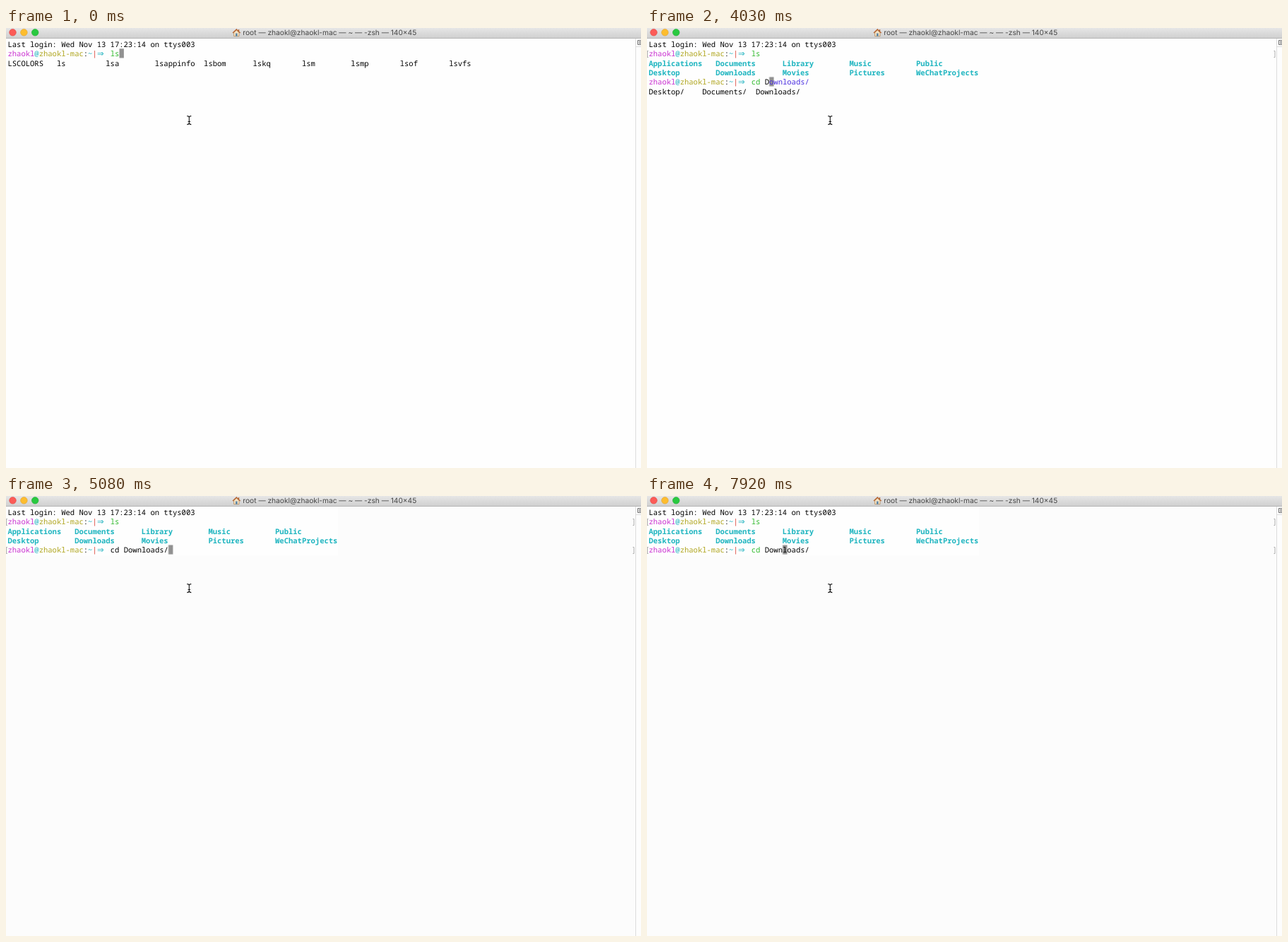
Animation of 899x623 px, one loop 8000 ms. Source, as an HTML page:

```html
<!DOCTYPE html>
<html lang="en">
<head>
<meta charset="utf-8">
<title>Terminal</title>
<style>
html, body { margin: 0; width: 100%; height: 100%; overflow: hidden; background: #fefefe; }
svg { display: block; width: 899px; height: 623px; }
text { white-space: pre; text-rendering: geometricPrecision; }
.term { font: 10.53px "Noto Sans Mono", "DejaVu Sans Mono", monospace; fill: #000; }
.title { font: 10.2px Inter, "Liberation Sans", sans-serif; fill: #464646; }
.dirs { font-weight: 700; fill: #1fb5c0; }
.user { fill: #c92fd0; }
.host { fill: #afa51e; }
.cyan { fill: #22b3c0; }
.red { fill: #d8382c; }
.green { fill: #2fba2c; }
.hint { fill: #4a2ee0; }
.arrow { font: 11.5px "DejaVu Sans", sans-serif; }
.marks { fill: none; stroke: #9a9a9a; stroke-width: .8; }

/* 1% = 80 ms; everything switches in hard steps */
.anim, .anim tspan, .cursor { animation: 8s step-end infinite; }
.first { animation-name: first; }
.listing { animation-name: listing; }
.prompt { animation-name: prompt; }
.long { animation-name: long; }
.typed { animation-name: typed; }
.cmds { animation-name: cmds; }
.three { animation-name: three; }
.two { animation-name: two; }
.entered { animation-name: entered; }
.after { animation-name: after; }
.flash { animation-name: flash; }
.cursor { animation-name: cursor; }
.typed .cd { animation-name: cd; }
.typed .d { animation-name: d; }
.typed .o { animation-name: o; }
.typed .rest { animation-name: rest; }

@keyframes first { 0% { visibility: visible } 16.875%, 100% { visibility: hidden } }
@keyframes listing { 0% { visibility: hidden } 16.875%, 100% { visibility: visible } }
@keyframes prompt { 0% { visibility: hidden } 18.75%, 100% { visibility: visible } }
@keyframes long { 0% { visibility: hidden } 28.125% { visibility: visible } 30%, 100% { visibility: hidden } }
@keyframes typed { 0% { visibility: hidden } 30%, 100% { visibility: visible } }
@keyframes cmds { 0% { visibility: hidden } 30% { visibility: visible } 50.375%, 100% { visibility: hidden } }
@keyframes three { 0% { visibility: hidden } 50.375% { visibility: visible } 52.25%, 100% { visibility: hidden } }
@keyframes two { 0% { visibility: hidden } 52.25% { visibility: visible } 54.125%, 100% { visibility: hidden } }
@keyframes entered { 0% { visibility: hidden } 59.75%, 100% { visibility: visible } }
@keyframes after { 0% { visibility: hidden } 61.625%, 100% { visibility: visible } }
@keyframes flash {
  0% { opacity: 0 } 59.75% { opacity: .19 } 61.625% { opacity: 0 }
  78.375% { opacity: .17 } 80.25%, 100% { opacity: 0 }
}
@keyframes cd {
  0% { fill: #000 } 31.75% { fill: #2fba2c } 59.75% { fill: #000 } 89.625%, 100% { fill: #2fba2c }
}
@keyframes d { 0% { fill: #4a2ee0 } 50.375%, 100% { fill: #000 } }
@keyframes o { 0% { fill: #4a2ee0 } 52.25%, 100% { fill: #000 } }
@keyframes rest { 0% { fill: #4a2ee0 } 54.125%, 100% { fill: #000 } }
@keyframes cursor {
  0% { transform: translate(157.95px, 13.37px) }
  16.875% { transform: translate(0, 53.48px) }
  18.75% { transform: translate(145.31px, 53.48px) }
  28.125% { transform: translate(151.63px, 53.48px) }
  30% { transform: translate(157.95px, 53.48px) }
  31.75% { transform: translate(164.27px, 53.48px) }
  50.375% { transform: translate(170.59px, 53.48px) }
  52.25% { transform: translate(176.9px, 53.48px) }
  54.125% { transform: translate(183.22px, 53.48px) }
  59.75% { transform: translate(227.45px, 53.48px) }
  89.625% { transform: translate(221.13px, 53.48px) }
  91.5% { transform: translate(214.81px, 53.48px) }
  93.375% { transform: translate(208.49px, 53.48px) }
  95.25% { transform: translate(202.18px, 53.48px) }
  97.125% { transform: translate(195.86px, 53.48px) }
  99%, 100% { transform: translate(189.54px, 53.48px) }
}
</style>
</head>
<body>
<svg viewBox="0 0 899 623">
  <defs>
    <linearGradient id="bar" x2="0" y2="1">
      <stop stop-color="#e6e6e6"/><stop offset="1" stop-color="#d0d0d0"/>
    </linearGradient>
    <g id="ps1">
      <text><tspan class="user">zhaokl</tspan><tspan class="cyan">@</tspan><tspan class="host">zhaokl-mac</tspan>:<tspan class="cyan">~</tspan><tspan class="red">|</tspan></text>
      <text x="126.4" class="cyan arrow">⇒</text>
    </g>
    <path id="marks" d="M2 32.5H.5V41.5H2M887.5 32.5H889V41.5H887.5"/>
  </defs>

  <rect width="899" height="623" fill="#fefefe"/>
  <g class="anim after">
    <rect y="15" width="891" height="608" fill="#fcfcfc"/>
    <rect y="15" width="470" height="69" fill="#fefefe"/>
  </g>

  <rect class="cursor" x="2.5" y="15.9" width="6.4" height="13.2" fill="#919191"/>

  <g class="term" transform="translate(2.5 27)">
    <text>Last login: Wed Nov 13 17:23:14 on ttys003</text>
    <g transform="translate(0 13.37)">
      <use href="#ps1"/>
      <text x="145.3" class="green">ls</text>
    </g>
    <text y="26.74" class="anim first">LSCOLORS   ls         lsa        lsappinfo  lsbom      lskq       lsm        lsmp       lsof       lsvfs</text>
    <g class="anim listing">
      <text y="26.74" class="dirs">Applications   Documents      Library        Music          Public</text>
      <text y="40.11" class="dirs">Desktop        Downloads      Movies         Pictures       WeChatProjects</text>
    </g>
    <g transform="translate(0 53.48)">
      <g class="anim prompt"><use href="#ps1"/></g>
      <g class="anim long">
        <text x="145.3">c<tspan class="hint">p -r ~/Documents/projects/demo/src/main/resources/config/ ~/Documents/projects/demo/build/classes/main/resources/con</tspan></text>
        <text y="13.37" class="hint">fig/</text>
      </g>
      <text x="145.3" class="anim typed"><tspan class="cd">cd</tspan> <tspan class="d">D</tspan><tspan class="o">o</tspan><tspan class="rest">wnloads/</tspan></text>
    </g>
    <g transform="translate(0 66.85)">
      <text class="anim cmds">CDPATH  cd      cdpath</text>
      <text class="anim three">Desktop/    Documents/  Downloads/</text>
      <text class="anim two">Documents/  Downloads/</text>
    </g>
  </g>

  <g class="marks">
    <use href="#marks" class="anim listing"/>
    <use href="#marks" y="40" class="anim entered"/>
  </g>
  <rect class="anim flash" y="15" width="891" height="608" fill="#a0a0a0"/>

  <!-- scroll track -->
  <rect x="891" y="15" width="8" height="608" fill="#fdfdfd"/>
  <path d="M891.5 15V623M892 26.5H899" stroke="#dcdcdc"/>
  <path d="M899 17.5H894.5V23.5H899M896 19.5H899M896 21.5H899" fill="none" stroke="#6a6a6a"/>

  <!-- title bar -->
  <rect width="899" height="14" fill="url(#bar)"/>
  <rect y="14" width="899" height="1" fill="#b4b4b4"/>
  <g stroke-width=".6">
    <circle cx="9.5" cy="6.3" r="4.8" fill="#fc5b57" stroke="#dd4540"/>
    <circle cx="25.4" cy="6.3" r="4.8" fill="#fdbd2e" stroke="#dea033"/>
    <circle cx="41.2" cy="6.3" r="4.8" fill="#29c940" stroke="#25a934"/>
  </g>
  <path d="M322.6 6.5V11.6H330V6.5L326.3 3Z" fill="#f3e2c4" stroke="#b58a58" stroke-width=".8"/>
  <path d="M321 7L326.3 2L331.6 7M329.5 2V5" fill="none" stroke="#b5632f" stroke-width="1.3"/>
  <rect x="325" y="7.5" width="2.6" height="4.1" fill="#5b87a8"/>
  <text x="335.3" y="10.4" class="title">root — zhaokl@zhaokl-mac — ~ — -zsh — 140×45</text>

  <!-- mouse pointer -->
  <path d="M256.3 124.6Q259.3 124.6 259.3 126.6Q259.3 124.6 262.3 124.6M259.3 126V135.5M256.3 136.6Q259.3 136.6 259.3 134.6Q259.3 136.6 262.3 136.6M257.6 132.5H261" fill="none" stroke="#111" stroke-width="1.1"/>
</svg>
</body>
</html>
```
